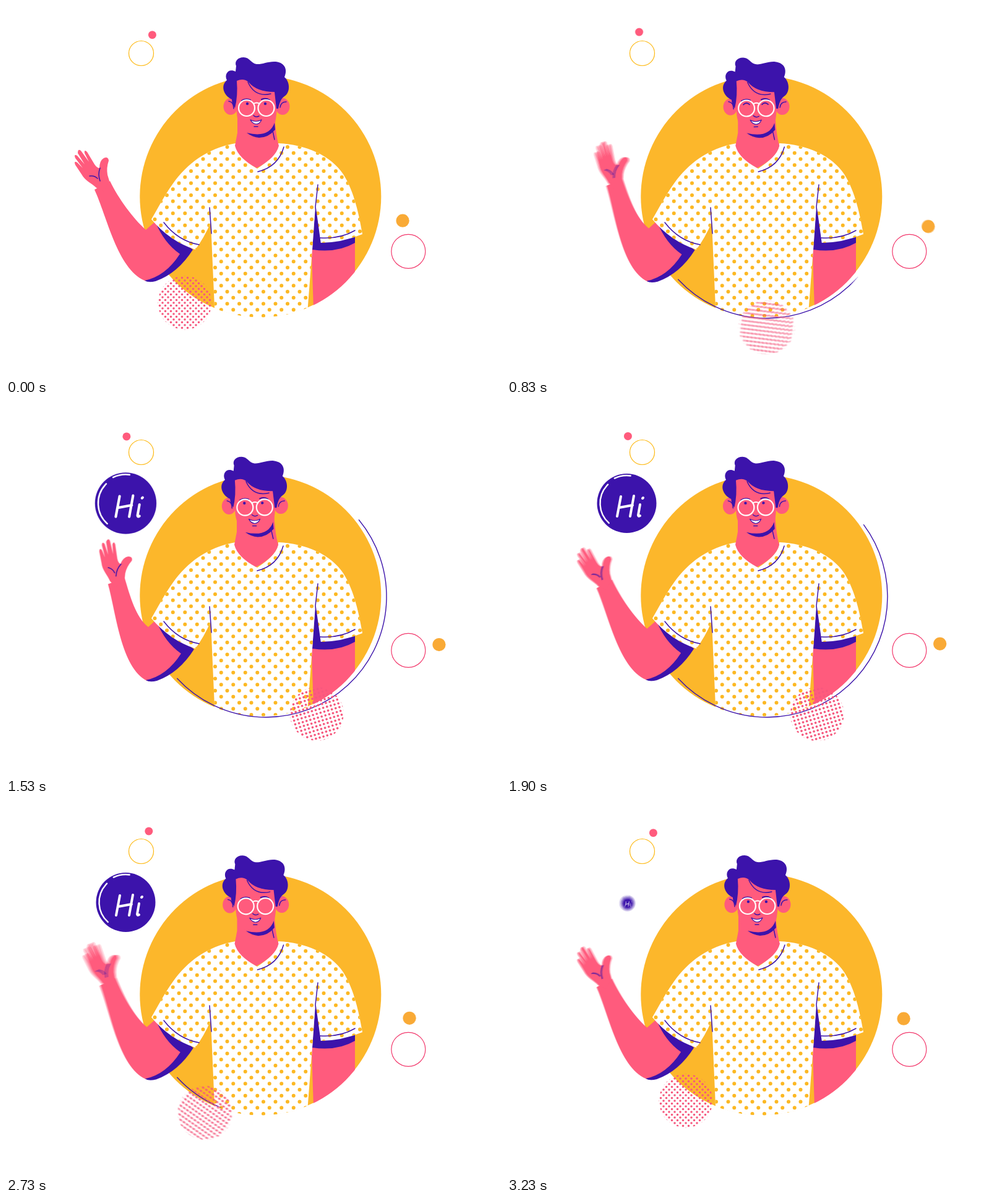
These frames come from a looping animation (800x600 px, 3260 ms). An HTML page with a canvas:

```html
<!DOCTYPE html>
<html lang="en">
<head>
<meta charset="utf-8">
<title>Waving hello</title>
<style>
html, body { margin: 0; width: 100%; height: 100%; overflow: hidden; background: #fff; }
canvas { display: block; width: 800px; height: 600px; }
</style>
</head>
<body>
<canvas id="stage" width="800" height="600"></canvas>
<script>
const LOOP = 3260, FRAMES = 98, WAVE = 14, SAMPLES = 5, SHUTTER = .45;
const TAU = Math.PI * 2, DEG = Math.PI / 180;
const PURPLE = '#3c13ab', PINK = '#ff5b7d', ORANGE = '#fcb72b', AMBER = '#f9aa36', WHITE = '#fff';

const out = document.getElementById('stage').getContext('2d');
const buffer = document.createElement('canvas');
buffer.width = 800;
buffer.height = 600;
const c = buffer.getContext('2d');

const ease = u => u < .5 ? 4 * u ** 3 : 1 - 4 * (1 - u) ** 3;

function fill(path, color) {
  c.fillStyle = color;
  c.fill(new Path2D(path));
}

function line(path, width = 1.5, color = PURPLE) {
  c.strokeStyle = color;
  c.lineWidth = width;
  c.stroke(new Path2D(path));
}

function disc(x, y, r, color) {
  c.beginPath();
  c.arc(x, y, r, 0, TAU);
  c.fillStyle = color;
  c.fill();
}

function arc(x, y, r, from, to, width, color) {
  c.beginPath();
  c.arc(x, y, r, from * DEG, to * DEG);
  c.lineWidth = width;
  c.strokeStyle = color;
  c.stroke();
}

const ring = (x, y, r, color) => arc(x, y, r, 0, 360, 1.2, color);

function group(draw) {
  c.save();
  draw();
  c.restore();
}

function clipDisc(x, y, r) {
  c.beginPath();
  c.arc(x, y, r, 0, TAU);
  c.clip();
}

function turn(x, y, angle) {
  c.translate(x, y);
  c.rotate(angle * DEG);
  c.translate(-x, -y);
}

// Staggered dots inside a box
function lattice(x0, y0, x1, y1, step, r) {
  const path = new Path2D();
  for (let row = 0, y = y0; y <= y1; row++, y += step / 2) {
    for (let x = x0 + (row % 2) * step / 2; x <= x1; x += step) {
      path.moveTo(x + r, y);
      path.arc(x, y, r, 0, TAU);
    }
  }
  return path;
}

const shirtDots = lattice(221, 228, 590, 510, 19.5, 3);
const ballDots = lattice(-45, -45, 45, 45, 9, 1.8);

const TORSO = 'M371 222C325 230 293 255 270 287C255 308 245 328 235 345Q264 380 306 394Q320 375 331 350' +
  'L338 510H486L495 394L500 325L508 383Q542 383 576 369C571 340 563 300 545 272' +
  'C525 242 485 224 440 222Q441 240 406 263Q375 245 371 222Z';
const HAND = 'M146 294C138 286 128 283 122 272L112 257Q109 250 115 253L124 262L112 246Q109 239 115 242' +
  'L127 256L116 238Q116 230 121 234L134 252L127 238Q126 231 131 236L143 256Q147 262 151 262' +
  'Q151 250 158 246Q165 243 166 250Q162 262 164 273L167 283L158 300Z';
const HAIR = 'M370 165Q365 158 365 151C352 145 346 129 357 120C352 110 360 100 371 106L372 97' +
  'C369 90 374 83 384 83C394 83 396 93 405 94C413 95 424 89 436 90C452 92 455 104 450 115' +
  'C459 122 460 140 450 146C443 151 442 158 440 166L437 166L434 139Q405 139 392 123Q384 116 373 121' +
  'Q375 145 370 165Z';

function arm(lift) {
  const a = 9.5 * lift * DEG, cos = Math.cos(a), sin = Math.sin(a);
  const swing = (x, y) => {
    const dx = x - 200, dy = y - 430;
    return [200 + dx * cos - dy * sin, 430 + dx * sin + dy * cos];
  };
  const wrist = swing(143, 297);
  c.beginPath();
  c.moveTo(...wrist);
  c.bezierCurveTo(...swing(163, 340), 180 + 6 * lift, 425, 224 + 4 * lift, 444 + 2 * lift);
  c.quadraticCurveTo(245, 449, 281, 420);
  c.lineTo(302, 394);
  c.lineTo(243, 347);
  c.lineTo(226 + 4 * lift, 362 - 3 * lift);
  c.bezierCurveTo(205 + 5 * lift, 343, ...swing(182, 312), ...swing(168, 283));
  c.lineTo(...wrist);
  c.fillStyle = PINK;
  c.fill();
  group(() => {
    turn(200, 430, 9.5 * lift);
    turn(156, 290, 14 * lift);
    fill(HAND, PINK);
    line('M135 275Q143 274 148 279M152 262Q148 272 152 283');
  });
  group(() => {
    c.translate(2 * lift, lift);
    fill('M241 348L302 394Q278 432 242 445Q230 448 224 444Q258 437 281 401Q255 383 241 348Z', PURPLE);
  });
}

function body() {
  group(() => {
    clipDisc(411.3, 308.5, 195);
    fill('M493 370H564V520H498Z', PINK);
    fill('M500 320L495 394Q535 400 564 383V372L508 380Z', PURPLE);
    fill(TORSO, WHITE);
    c.clip(new Path2D(TORSO));
    c.fillStyle = '#fcb823';
    c.fill(shirtDots);
  });
  line('M329 326L332 368M255 350Q278 380 312 386M504 289L500 325L508 383M508 375Q540 377 564 363');
}

function neck() {
  fill('M374 165L374 205Q372 216 370 226Q375 246 405 262Q436 246 441 226Q435 205 434 170Z', PINK);
  line('M449 228Q440 260 407 268');
}

function eyes(f, look) {
  if (f > 21.6 && f < 28.4) {
    line('M384 159Q389 154 394 159M414 159Q419 154 424 159', 1.8);
  } else if (f < 79.6 || f > 84.4) {
    disc(390 - 2 * look, 158, 2.2, PURPLE);
    disc(419 - 2 * look, 158, 2.2, PURPLE);
  }
}

function head(f, look) {
  for (const x of [363, 447]) {
    c.beginPath();
    c.ellipse(x, 162.5, 11.5, 13.5, 0, 0, TAU);
    c.fillStyle = PINK;
    c.fill();
  }
  line('M360 154Q368 155 368 166M443 164Q444 155 453 155');
  fill('M370 115H438Q440 165 435 188Q426 209 402 208Q376 204 373 175Z', PINK);
  fill('M389 205Q425 214 434 189L435 200Q424 213 409 213Q398 212 389 205Z', PURPLE);
  line('M431 202L434 216');
  fill(HAIR, PURPLE);
  line('M391 123Q402 148 428 142');
  line('M381 153Q387 149 395 152M413 151Q420 148 426 152', 2);
  eyes(f, look);
  arc(389, 165, 13, 0, 360, 2.2, WHITE);
  arc(420.5, 165, 13, 0, 360, 2.2, WHITE);
  line('M400 158Q405 155 410 158', 2, WHITE);
  line('M400 177Q404 181 409 178');
  fill('M395 184Q404 189 413 184Q410 191 404 191Q398 190 395 184Z', WHITE);
  line('M395 184Q398 190 404 191Q410 191 413 184M395 184Q404 189 413 184', 1.2);
  line('M401 195H407');
}

function bubbleSize(f) {
  if (f < 36) return 0;
  if (f < 48) {
    const v = (f - 36) / 12 - 1;
    return 1 + 2.7 * v ** 3 + 1.7 * v * v;
  }
  return f < 91.5 ? 1 : 1 - ((f - 91.5) / 6.2) ** 2;
}

function bubble(size) {
  if (size <= 0) return;
  c.translate(195, 161);
  c.scale(size, size);
  c.translate(-195, -161);
  disc(193.5, 159, 48, PURPLE);
  arc(193.5, 159, 43, 132, 225, 2.4, WHITE);
  arc(193.5, 159, 45, 244, 278, 2.4, WHITE);
  // Hand-lettered "Hi"
  line('M184 148L178 180M205 147L199 180M181 166L203 162M215 161L212 178Q212 181 215 179M220 150L219 151', 4, WHITE);
}

// A disc on an orbit, with the angle counted clockwise from the top
function satellite(x, y, orbit, angle, r, color) {
  disc(x + orbit * Math.sin(angle * DEG), y - orbit * Math.cos(angle * DEG), r, color);
}

function scene(time) {
  const f = (time + FRAMES) % FRAMES;
  const d = Math.min(f, FRAMES - f);
  const k = ease(d / 49);
  const roll = ease(Math.min(1, d / 46));
  const sway = Math.sin(d / 49 * Math.PI / 2);
  const phase = f % WAVE;
  const lift = 1 - Math.exp(-15 * (Math.min(phase, WAVE - phase) / 7) ** 2.7);

  c.fillStyle = WHITE;
  c.fillRect(0, 0, 800, 600);
  c.lineCap = c.lineJoin = 'round';

  ring(218.5, 76.5, 20, '#fdb913');
  satellite(218.5, 76.5, 34.8, 31 - 73.8 * k, 6.5, PINK);
  ring(650.3, 396.8, 27.5, '#f2386c');
  satellite(650.3, 396.8, 50.5, -10.5 + 90 * k, 10.6, AMBER);

  disc(411.3, 308, 195, ORANGE);
  arm(lift);
  body();
  group(() => {
    c.translate(-sway, 0);
    neck();
  });
  group(() => {
    c.translate(-2 * sway, .5 * sway);
    turn(405, 230, -.6 * sway);
    head(f, sway * k);
  });

  if (k > .001) {
    c.beginPath();
    c.arc(420, 310, 195, 137.3 * DEG, (137.3 - 177 * k) * DEG, true);
    c.strokeStyle = PURPLE;
    c.lineWidth = 1.4;
    c.stroke();
  }

  group(() => {
    c.translate(412, 310.5);
    c.rotate(-61.5 * roll * DEG);
    c.translate(-123, 169.5);
    clipDisc(0, 0, 43.5);
    c.fillStyle = '#f6587e';
    c.fill(ballDots);
  });
  group(() => bubble(bubbleSize(f)));
}

// Averages a few moments around the frame for motion blur
function render(frame) {
  for (let i = 0; i < SAMPLES; i++) {
    scene(frame + (i / (SAMPLES - 1) - .5) * SHUTTER);
    out.globalAlpha = 1 / (i + 1);
    out.drawImage(buffer, 0, 0);
  }
}

const start = performance.now();
let shown = -1;
function tick() {
  const t = (performance.now() - start) % LOOP;
  const frame = Math.floor((t + 5) * .03);
  if (frame !== shown) render(shown = frame);
  requestAnimationFrame(tick);
}
tick();
</script>
</body>
</html>
```
